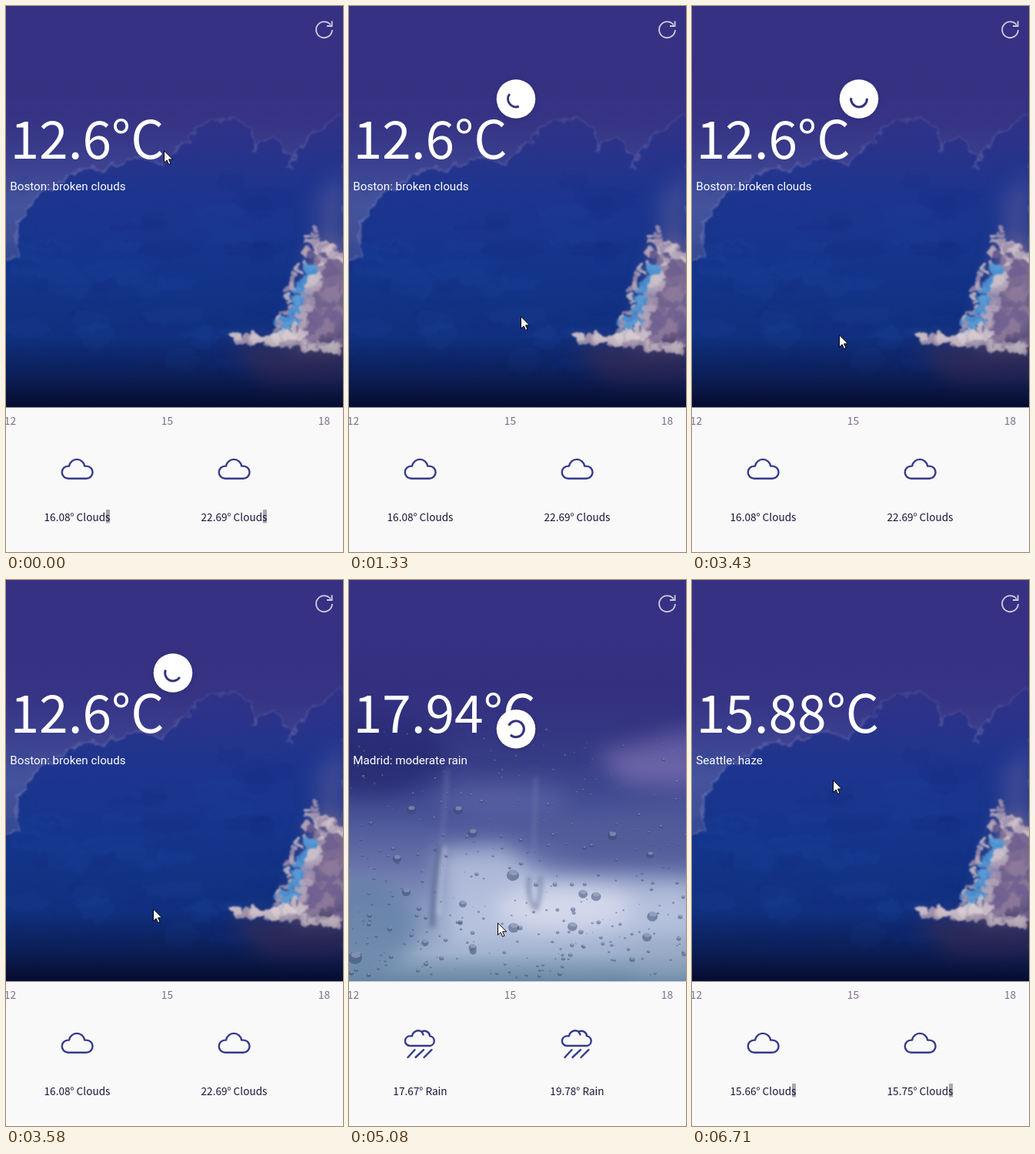
Write an HTML page that moves like this. It is 438 px wide and 708 px high and loops after 6.77 s.

```html
<!DOCTYPE html>
<html lang="en">
<head>
<meta charset="utf-8">
<title>Weather</title>
<style>
html,body{margin:0;width:100%;height:100%;overflow:hidden;background:#f9f9f9}
svg{display:block;width:100vw;height:100vh}
.cjk{font-family:'Noto Sans CJK JP','Noto Sans CJK SC','Noto Sans CJK',sans-serif}
.rob{font-family:Roboto,sans-serif}
</style>
</head>
<body>
<svg viewBox="0 0 438 708" xmlns="http://www.w3.org/2000/svg">
<defs>
  <linearGradient id="sky" x1="0" y1="0" x2="0" y2="520" gradientUnits="userSpaceOnUse">
    <stop offset=".13" stop-color="#363182"/><stop offset=".3" stop-color="#38398b"/>
    <stop offset=".5" stop-color="#44539d"/><stop offset="1" stop-color="#243870"/>
  </linearGradient>
  <linearGradient id="mass" x1="0" y1="140" x2="0" y2="520" gradientUnits="userSpaceOnUse">
    <stop offset="0" stop-color="#2a348c"/><stop offset=".25" stop-color="#1e358f"/>
    <stop offset=".55" stop-color="#13348a"/><stop offset=".8" stop-color="#102f7c"/><stop offset="1" stop-color="#0b2358"/>
  </linearGradient>
  <linearGradient id="dusk" x1="0" y1="420" x2="0" y2="520" gradientUnits="userSpaceOnUse">
    <stop offset=".1" stop-color="#080c30" stop-opacity="0"/><stop offset=".6" stop-color="#090e38" stop-opacity=".38"/>
    <stop offset="1" stop-color="#070a2a" stop-opacity=".88"/>
  </linearGradient>
  <linearGradient id="pane" x1="0" y1="0" x2="0" y2="520" gradientUnits="userSpaceOnUse">
    <stop offset=".12" stop-color="#363182"/><stop offset=".26" stop-color="#30307e"/>
    <stop offset=".45" stop-color="#383d86"/><stop offset=".58" stop-color="#465296"/>
    <stop offset=".7" stop-color="#6570a8"/><stop offset=".82" stop-color="#8a9bc2"/>
    <stop offset=".93" stop-color="#9db0cb"/><stop offset="1" stop-color="#6887a4"/>
  </linearGradient>
  <linearGradient id="head" x1="0" y1="0" x2="0" y2="240" gradientUnits="userSpaceOnUse">
    <stop offset=".28" stop-color="#363182"/><stop offset="1" stop-color="#363182" stop-opacity="0"/>
  </linearGradient>
  <filter id="rough" x="-10%" y="-10%" width="120%" height="120%" color-interpolation-filters="sRGB">
    <feTurbulence type="fractalNoise" baseFrequency=".07" numOctaves="3" seed="4"/>
    <feDisplacementMap in="SourceGraphic" scale="16" xChannelSelector="R" yChannelSelector="G"/>
    <feGaussianBlur stdDeviation=".9"/>
  </filter>
  <filter id="soft" x="-40%" y="-40%" width="180%" height="180%" color-interpolation-filters="sRGB"><feGaussianBlur stdDeviation="14"/></filter>
  <filter id="haze" x="-40%" y="-40%" width="180%" height="180%" color-interpolation-filters="sRGB"><feGaussianBlur stdDeviation="3"/></filter>
</defs>
<g id="clouds"></g>
<g id="rain"></g>
<rect width="438" height="240" fill="url(#head)"/>
<rect y="520.5" width="438" height="188" fill="#f9f9f9"/>
<g fill="none" stroke="#cfcde2" stroke-width="1.8">
  <path d="M421.8 24.5A10.4 10.4 0 1 0 423.9 31"/><path d="M423.6 19.5V26H417"/>
</g>
<text id="temp" class="cjk" x="5.4" y="198.4" font-size="67.8" fill="#fff"></text>
<text id="city" class="rob" x="5.3" y="239" font-size="15.2" fill="#fff"></text>
<g id="hours" class="cjk" font-size="13.8" fill="#7f6e88" text-anchor="middle"></g>
<g id="cells"></g>
<g id="spin">
  <circle cy="1" r="25" fill="#101040" opacity=".25" filter="url(#haze)"/>
  <circle r="25.3" fill="#fff"/>
  <path id="arc" fill="none" stroke="#33327f" stroke-width="3"/>
  <path id="tip" d="M-6.5 -.5H6.5L0 7Z" fill="#33327f"/>
</g>
<path id="mouse" d="M.5 .8V16.3L4.1 12.9 6.6 18.4 9 17.4 6.6 11.9H11.6Z" fill="#fff" stroke="#000"/>
</svg>
<script>
const $ = id => document.getElementById(id);
const mix = (a, b, f) => a + (b - a) * f;
const clamp = v => Math.max(0, Math.min(1, v));
const easeOut = v => 1 - (1 - clamp(v)) ** 1.5;
const repeat = (n, fn) => Array.from({ length: n }, (_, i) => fn(i, i / (n - 1))).join('');

// Small seeded generator
let seed = 11;
const rnd = (a = 0, b = 1) => {
  seed = (seed * 16807) % 2147483647;
  return mix(a, b, seed / 2147483647);
};
const pick = list => list[Math.floor(rnd(0, list.length))];
const blob = (x, y, rx, ry, fill, o) =>
  `<ellipse cx="${x}" cy="${y}" rx="${rx}" ry="${ry}" fill="${fill}" opacity="${o}"/>`;

// Joins anchor points with arcs that bulge outwards
function billow(points) {
  return points.map(([x, y], i) => {
    if (!i) return `M${x} ${y}`;
    const r = Math.hypot(x - points[i - 1][0], y - points[i - 1][1]) * .8;
    return `A${r} ${r} 0 0 1 ${x} ${y}`;
  }).join('');
}

// Scatters puffs along a line
const puffs = (n, [x1, y1], [x2, y2], spread, size, colours) => repeat(n, (i, f) => blob(
  mix(x1, x2, f) + rnd(-spread, spread), mix(y1, y2, f) + rnd(-spread, spread) * .6,
  rnd(.5, 1) * size, rnd(.4, .9) * size, pick(colours), .85));

function cloudScene() {
  const rim = billow([[0, 333], [20, 324], [28, 266], [66, 236], [130, 214], [206, 208], [236, 178], [276, 149],
    [313, 155], [323, 188], [345, 172], [372, 212], [386, 183], [413, 160], [440, 142]]);
  const cream = ['#cdbfc8', '#b5a6b8', '#a08fab'];
  const mauve = ['#7d6b92', '#6e6090', '#8b789a'];
  return `<rect width="438" height="520" fill="url(#sky)"/>
    <g filter="url(#rough)">
      <path d="${rim}V530H-10V333Z" fill="url(#mass)"/>
      <path d="${rim}" fill="none" stroke="#8288bd" stroke-width="2.5" opacity=".45"/>
      ${repeat(50, () => blob(rnd(20, 360), rnd(225, 470), rnd(12, 45), rnd(5, 17), pick(['#1c469a', '#152a80']), .18))}
    </g>
    <g filter="url(#soft)">
      <path d="M405 250L440 210V330H410Z" fill="#5c5c9a" opacity=".6"/>
      <path d="M408 300L450 325V445L370 440Z" fill="#7d6a90"/>
      <path d="M290 440L450 430V495H340Z" fill="#3f3560" opacity=".8"/>
    </g>
    <g filter="url(#rough)">
      ${puffs(46, [424, 335], [408, 432], 24, 13, mauve)}
      ${puffs(24, [398, 342], [360, 424], 10, 11, ['#4b90d1', '#5a9bd6', '#3f7dc4'])}
      ${puffs(30, [402, 286], [347, 428], 5, 5, cream)}
      ${puffs(26, [412, 322], [376, 430], 7, 7, cream)}
      ${puffs(18, [405, 308], [436, 326], 5, 8, cream)}
      ${puffs(44, [297, 429], [438, 444], 5, 8, cream)}
      ${puffs(12, [352, 430], [386, 424], 8, 9, ['#d8ccd0', '#c8bac6'])}
    </g>
    <rect y="420" width="438" height="101" fill="url(#dusk)"/>`;
}

const bead = (x, y, r) => blob(x, y, r, r * .9, '#34456f', .5) +
  blob(x + r * .1, y - r * .45, r * .7, r * .45, '#b4c0da', .45);

function rainScene() {
  return `<rect width="438" height="521" fill="url(#pane)"/>
    <g filter="url(#soft)">
      ${blob(30, 225, 95, 55, '#25286f', .75)}
      ${blob(200, 285, 85, 22, '#666cab', .55)}
      <path d="M320 225L455 188V270L360 265Z" fill="#776db0" opacity=".8"/>
      <path d="M230 310L455 290V372L300 368Z" fill="#515b98" opacity=".75"/>
      <path d="M115 350L200 345 260 385 455 392V465L130 475Z" fill="#c3cce4" opacity=".75"/>
      ${blob(280, 425, 90, 30, '#dce1f0', .75)}
      ${blob(20, 450, 70, 60, '#5d7ba2', .7)}
      ${blob(420, 490, 60, 30, '#8fa3be', .5)}
    </g>
    <g filter="url(#haze)" fill="none">
      <path d="M118 345Q110 395 108 450" stroke="#45587f" stroke-width="7" opacity=".6"/>
      <path d="M124 345Q116 395 116 435" stroke="#d5dbec" stroke-width="4" opacity=".7"/>
      <path d="M128 245L121 340M243 255L240 375" stroke="#7e88ba" stroke-width="3" opacity=".6"/>
      <path d="M234 385Q232 410 240 425M248 385Q251 405 243 428" stroke="#4f6189" stroke-width="4" opacity=".7"/>
    </g>
    ${repeat(420, () => {
      const y = 515 - 325 * rnd() ** 1.15;
      return bead(rnd(0, 438), y, rnd(.6, 1.6 + (y - 180) / 170) * rnd(.6, 1.2));
    })}
    ${repeat(16, () => bead(rnd(0, 438), rnd(290, 505), rnd(4, 7)))}
    ${bead(213, 383, 8)}${bead(214, 451, 7)}${bead(8, 490, 9)}`;
}

$('clouds').innerHTML = cloudScene();
$('rain').innerHTML = rainScene();
$('hours').innerHTML = repeat(3, i => `<text x="${5.5 + 204 * i}" y="543">${12 + 3 * i}</text>`);

const ICONS = {
  Clouds: '<path d="M-11.7 12.7H12A8 8 0 0 0 12 -3.4H9.6A10.1 10.1 0 0 0 -10.4 -3.4H-11.7A8 8 0 0 0 -11.7 12.7Z"/>',
  Rain: '<path d="M-13.3 4H13.2A6.4 6.4 0 0 0 12.6 -8.6A7 7 0 0 0 2 -14.2A8 8 0 0 0 -10.5 -8.6H-13.3A6.3 6.3 0 0 0 -13.3 4Z"/>' +
    '<path d="M2 -14.2L4 -10.5M-7 9.2L-16 19M4.5 9.2L-6 19M15 9.2L5 19"/>'
};

const VIEWS = [
  { temp: '12.6', city: 'Boston: broken clouds', sky: 'Clouds', next: ['16.08', '22.69'] },
  { temp: '17.94', city: 'Madrid: moderate rain', sky: 'Rain', next: ['17.67', '19.78'] },
  { temp: '15.88', city: 'Seattle: haze', sky: 'Clouds', next: ['15.66', '15.75'] }
];

const cell = (v, deg, i) => `<g transform="translate(${92.5 + 204 * i} 600)">
  <g fill="none" stroke="#363a8c" stroke-width="2.4" stroke-linecap="round" stroke-linejoin="round">${ICONS[v.sky]}</g>
  <rect class="mark" x="${v.sky === 'Rain' ? 30 : 37.5}" y="53" width="5" height="17.5" fill="#aca7b0"/>
  <text class="cjk" y="68" font-size="13.6" fill="#1a1438" text-anchor="middle">${deg}° ${v.sky}</text></g>`;

let shown;
function show(v) {
  if (v === shown) return;
  shown = v;
  $('temp').textContent = v.temp + '°C';
  $('city').textContent = v.city;
  $('cells').innerHTML = v.next.map((d, i) => cell(v, d, i)).join('');
  $('clouds').style.display = v.sky === 'Clouds' ? '' : 'none';
  $('rain').style.display = v.sky === 'Rain' ? '' : 'none';
}

// Each pull drags down from start, loads, then swings back up between back and rest
const LOOP = 6770, STEP = 77.3, DRAG = 386, RELEASE = 460, SETTLE = 155;
const PULLS = [
  { start: 230, load: 1385, back: 1793, rest: 2101, from: [205, 187], down: [223, 402], bend: [115, 260] },
  { start: 2500, load: 3570, back: 3903, rest: 4211, from: [175, 204], down: [191, 426], bend: [75, 120] },
  { start: 4600, load: 5910, back: 5837, rest: 6300, from: [181, 282], down: [193, 444], bend: [-70, 260] },
  { start: 6710, load: LOOP, back: LOOP, rest: LOOP, from: [176, 207], down: [205, 424], bend: [0, 0] }
];
const STARTS = PULLS.flatMap(p => [p.start, p.back + STEP]);

// The screen advances in coarse steps while something moves
function stepped(t) {
  const from = Math.max(0, ...STARTS.filter(s => s <= t));
  return from ? from + Math.floor((t - from) / STEP) * STEP : 0;
}

function pointer(t, n) {
  const p = PULLS[n], up = PULLS[Math.min(n + 1, PULLS.length - 1)].from;
  if (t < p.back) {
    // Only the first drag starts from rest; later ones are already moving
    const lead = n ? STEP : 0;
    const f = easeOut((t - p.start + lead) / (DRAG + lead));
    return p.from.map((v, i) => mix(v, p.down[i], f));
  }
  const f = clamp((t - p.back) / (p.rest - p.back));
  return p.down.map((v, i) => mix(mix(v, p.bend[i], f), mix(p.bend[i], up[i], f), f));
}

function drawArc(a, b, arrow, alpha) {
  const R = 10.4, on = d => [R * Math.cos(d * Math.PI / 180), R * Math.sin(d * Math.PI / 180)];
  const end = on(b);
  $('arc').setAttribute('d', `M${on(a)}A${R} ${R} 0 ${b - a > 180 ? 1 : 0} 1 ${end}`);
  $('tip').setAttribute('transform', `translate(${end}) rotate(${b})`);
  $('tip').style.display = arrow ? '' : 'none';
  $('arc').style.opacity = $('tip').style.opacity = alpha;
}

function drawSpinner(age, done) {
  const y = age < RELEASE ? mix(70, 196, easeOut(age / DRAG)) : mix(196, 120.5, easeOut((age - RELEASE) / SETTLE));
  $('spin').setAttribute('transform', `translate(217 ${y}) scale(${done ? .32 : 1})`);
  if (age < RELEASE) {
    const k = clamp(age / DRAG), end = mix(3, 133, k);
    drawArc(end - 288 * k, end, true, mix(.3, 1, k));
  } else {
    const s = (age - RELEASE) / 1000;
    drawArc(-155 + 225 * s + 216 * s * s, 133 + 53 * s + 134 * s * s, false, 1);
  }
}

function draw(time) {
  const t = stepped(time);
  const n = Math.max(0, PULLS.filter(p => p.start <= t).length - 1);
  const { start, load } = PULLS[n], age = t - start;
  show(VIEWS[PULLS.filter((p, i) => i && t >= p.load).length]);

  const visible = age > STEP / 2 && t < load + STEP;
  $('spin').style.display = visible ? '' : 'none';
  if (visible) drawSpinner(age, t >= load);
  const busy = age >= RELEASE && t < load;
  document.querySelectorAll('.mark').forEach(m => m.style.display = busy ? 'none' : '');

  const [x, y] = pointer(t, n).map(Math.round);
  $('mouse').setAttribute('transform', `translate(${x} ${y})`);
}

const t0 = performance.now();
function tick() {
  draw((performance.now() - t0) % LOOP);
  requestAnimationFrame(tick);
}
tick();
</script>
</body>
</html>
```
